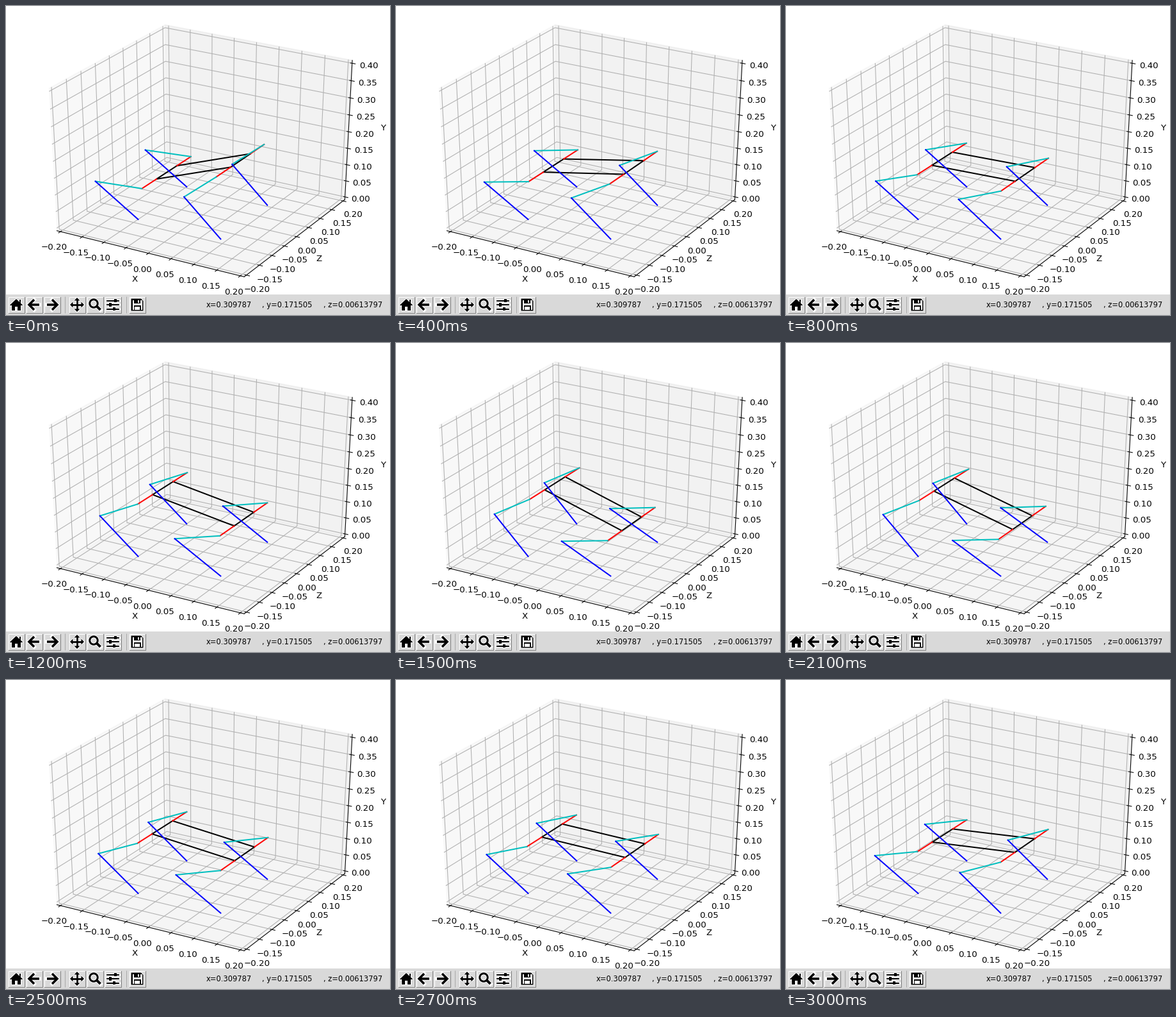
Write a matplotlib script that moves like this. It is 600 px wide and 482 px high and loops after 3100 ms.

```python
import itertools

import numpy as np
import matplotlib.pyplot as plt
from matplotlib.animation import FuncAnimation
from matplotlib.patches import Circle, Polygon, Rectangle

W, H, PLOT_H, DPI = 600, 482, 450, 96
FRAMES, INTERVAL = 31, 100

fig = plt.figure(figsize=(W / DPI, H / DPI), dpi=DPI, facecolor="white")
ax = fig.add_axes([0, 0, 1, 1])
ax.set_xlim(0, W)
ax.set_ylim(H, 0)
ax.axis("off")


def pt(px):
    return px * 72 / DPI


# ---- perspective view of a unit cube centred on the origin ----

ELEV, AZIM, DIST = np.radians(30), np.radians(-60), 10


def project(p):
    """Cube coordinates (right, depth, up) to stage pixels."""
    x, y, z = p
    right = -np.sin(AZIM) * x + np.cos(AZIM) * y
    front = np.cos(AZIM) * x + np.sin(AZIM) * y
    depth = DIST - np.cos(ELEV) * front - np.sin(ELEV) * z
    up = np.cos(ELEV) * z - np.sin(ELEV) * front
    return ((right / depth + 0.095) / 0.185 * W,
            PLOT_H - (up / depth + 0.095) / 0.185 * PLOT_H)


def project_all(points):
    return np.array([project(p) for p in points])


def world(x, y, z):
    """Metres (y up, z into the scene) to stage pixels."""
    return project((x / 0.4, z / 0.4, y / 0.4 - 0.5))


# ---- panes, grid, ticks and labels ----

E = 0.5 + 1 / 48          # pane edge, slightly outside the limits
TICK_IN, TICK_OUT = 1 / 120, 1 / 60
LABEL_GAP, TITLE_GAP = 0.0584, 0.127


def pane(corners, shade):
    ax.add_patch(Polygon(project_all(corners), closed=False, lw=1, zorder=1,
                         facecolor=(shade,) * 3, edgecolor=(shade,) * 3,
                         alpha=0.5))


def polyline(points, color="k", cap="projecting"):
    xy = project_all(points)
    ax.plot(xy[:, 0], xy[:, 1], color=color, lw=0.8, zorder=2,
            solid_capstyle=cap)


def axis(title, edge, grid, tick_axis, first):
    """edge(v, gap) gives a point on the axis line pushed outward by gap."""
    ticks = np.linspace(-0.5, 0.5, 9)
    polyline([edge(-E, 0), edge(E, 0)])
    for v in ticks:
        polyline(grid(v), "#b0b0b0", "butt")
    for i, v in enumerate(ticks):
        inner, outer = list(edge(v, 0)), list(edge(v, 0))
        side = np.sign(inner[tick_axis])
        inner[tick_axis] -= side * TICK_IN
        outer[tick_axis] += side * TICK_OUT
        polyline([inner, outer])
        text = f"{first + 0.05 * i:.2f}".replace("-", "\u2212")
        if abs(first + 0.05 * i) < 1e-9:
            text = "0.00"
        ax.text(*project(edge(v, LABEL_GAP)), text, fontsize=10,
                ha="center", va="top", zorder=3)
    ax.text(*project(edge(0, TITLE_GAP)), title, fontsize=10,
            ha="center", va="center", zorder=3)


pane([(-E, -E, -E), (-E, E, -E), (-E, E, E), (-E, -E, E)], 0.95)
pane([(-E, E, -E), (E, E, -E), (E, E, E), (-E, E, E)], 0.90)
pane([(-E, -E, -E), (E, -E, -E), (E, E, -E), (-E, E, -E)], 0.925)

axis("X", lambda v, g: (v, -E - g, -E - g),
     lambda v: [(v, -E, -E), (v, E, -E), (v, E, E)], 1, -0.2)
axis("Z", lambda v, g: (E + g, v, -E - g),
     lambda v: [(E, v, -E), (-E, v, -E), (-E, v, E)], 0, -0.2)
axis("Y", lambda v, g: (E + g, E + g, v),
     lambda v: [(E, E, v), (-E, E, v), (-E, -E, v)], 0, 0.0)

# ---- toolbar ----

BAR, MID = "#d9d9d9", 466
ax.add_patch(Rectangle((0, PLOT_H), W, H - PLOT_H, fc=BAR, lw=0, zorder=10))


def stroke(xs, ys, width=1, color="k", z=13, cap="butt"):
    ax.plot(xs, ys, color=color, lw=pt(width), zorder=z,
            solid_capstyle=cap, solid_joinstyle="miter")


def glyph(xs, ys, width):
    stroke(xs, ys, width + 2, "white", 12, "projecting")
    stroke(xs, ys, width)


def fill(points, color="k", z=13, halo=True):
    if halo:
        ax.add_patch(Polygon(points, fc="white", ec="white", lw=pt(2),
                             zorder=12))
    ax.add_patch(Polygon(points, fc=color, lw=0, zorder=z))


def box(x0, y0, x1, y1, color="k", z=13, halo=True):
    fill([(x0, y0), (x1, y0), (x1, y1), (x0, y1)], color, z, halo)


def button(cx):
    l, r, t, b = cx - 12.5, cx + 12.5, MID - 12.5, MID + 12.5
    stroke([l, l, r], [b, t, t], 1, "white", 11, "projecting")
    stroke([l, r, r], [b, b, t], 1, "#828282", 11, "projecting")


def home(cx):
    box(cx + 4.5, 458, cx + 7, 464)
    box(cx - 7, 465, cx + 7, 475)
    fill([(cx - 10.5, 467), (cx, 457), (cx + 10.5, 467)])
    box(cx - 2, 469, cx + 2, 475, "white", 14, False)


def arrow(cx, d):
    glyph([cx - 8 * d, cx + 8 * d], [MID, MID], 3.6)
    glyph([cx, cx + 8 * d, cx], [MID - 8, MID, MID + 8], 3.6)


def pan(cx):
    glyph([cx - 8, cx + 8], [MID, MID], 2.8)
    glyph([cx, cx], [MID - 8, MID + 8], 2.8)
    for dx, dy in [(1, 0), (-1, 0), (0, 1), (0, -1)]:
        fill([(cx + 11 * dx, MID + 11 * dy),
              (cx + 6.5 * dx + 4.5 * dy, MID + 6.5 * dy + 4.5 * dx),
              (cx + 6.5 * dx - 4.5 * dy, MID + 6.5 * dy - 4.5 * dx)])


def zoom(cx):
    glyph([cx + 3, cx + 8.5], [468.5, 474], 4)
    for width, color, z in [(5, "white", 12), (3, "k", 13)]:
        ax.add_patch(Circle((cx - 2, 464), 6.2, fc="none", ec=color,
                            lw=pt(width), zorder=z))


def sliders(cx):
    for y, knob in [(459.5, 4), (466, -4), (472.5, 2)]:
        glyph([cx - 10, cx + 10], [y, y], 2)
        box(cx + knob - 2, y - 2.8, cx + knob + 2, y + 2.8)


def save(cx):
    fill([(cx - 9.5, 456.5), (cx + 6, 456.5), (cx + 9.5, 460),
          (cx + 9.5, 475.5), (cx - 9.5, 475.5)])
    box(cx - 7.5, 458.5, cx + 7.5, 473.5, "white", 14, False)
    box(cx - 5.5, 457, cx + 4.5, 464, "k", 15, False)
    box(cx + 0.5, 458.5, cx + 3, 462.5, "white", 16, False)
    box(cx - 5.5, 467, cx + 5.5, 475, "k", 15, False)
    box(cx - 4, 468.5, cx + 4, 473.5, "white", 16, False)


icons = [(16, home), (44, lambda c: arrow(c, -1)), (72, lambda c: arrow(c, 1)),
         (111, pan), (139, zoom), (167, sliders), (205, save)]
for cx, draw in icons:
    button(cx)
    draw(cx)
for x in (91.5, 187.5):
    stroke([x, x], [453, 479], 1, "darkgray", 11)

for x, text in [(312.5, "x=0.309787"), (400.5, ", y=0.171505"),
                (495.5, ", z=0.00613797")]:
    ax.text(x, 470, text, fontsize=pt(11.5), va="baseline", zorder=13)

# ---- four-legged stick figure ----

LENGTH, WIDTH, HEIGHT = 0.186, 0.078, 0.14
HIP, THIGH, SHIN = 0.055, 0.1075, 0.130


def pitch_at(frame):
    keys = [0, 8, 12, 17, 18, 21, 25, 30]
    degrees = [27.2, 2.5, -12.1, -29.1, -30, -19.5, -7.6, 7.6]
    return np.radians(np.interp(frame, keys, degrees))


def knee(hip, foot):
    """Two-link joint that bends toward negative x."""
    reach = foot - hip
    d = np.hypot(*reach)
    ux, uy = reach / d
    along = (d * d + THIGH ** 2 - SHIN ** 2) / (2 * d)
    off = np.sqrt(THIGH ** 2 - along ** 2)
    return hip + along * np.array([ux, uy]) + off * np.array([uy, -ux])


def link(color):
    return ax.plot([], [], color=color, lw=1.5, zorder=5)[0]


SIDES = list(itertools.product((-1, 1), (-1, 1)))
body = [link("k") for _ in range(4)]
legs = [[link(c) for c in "rcb"] for _ in SIDES]


def join(line, a, b):
    line.set_data(*zip(world(*a), world(*b)))


def update(frame):
    pitch = pitch_at(frame)
    ends = {s: np.array([s * LENGTH / 2 * np.cos(pitch),
                         HEIGHT + s * LENGTH / 2 * np.sin(pitch)])
            for s in (-1, 1)}
    ring = [(*ends[s], t * WIDTH / 2)
            for s, t in [(-1, -1), (-1, 1), (1, 1), (1, -1)]]
    for i, line in enumerate(body):
        join(line, ring[i], ring[(i + 1) % 4])
    for (s, t), links in zip(SIDES, legs):
        z = t * (WIDTH / 2 + HIP)
        foot = np.array([s * LENGTH / 2, 0])
        chain = [(*ends[s], t * WIDTH / 2), (*ends[s], z),
                 (*knee(ends[s], foot), z), (*foot, z)]
        for line, a, b in zip(links, chain, chain[1:]):
            join(line, a, b)
    return body + sum(legs, [])


anim = FuncAnimation(fig, update, frames=FRAMES, interval=INTERVAL,
                     init_func=lambda: update(0), repeat=True, repeat_delay=0)
plt.show()
```
